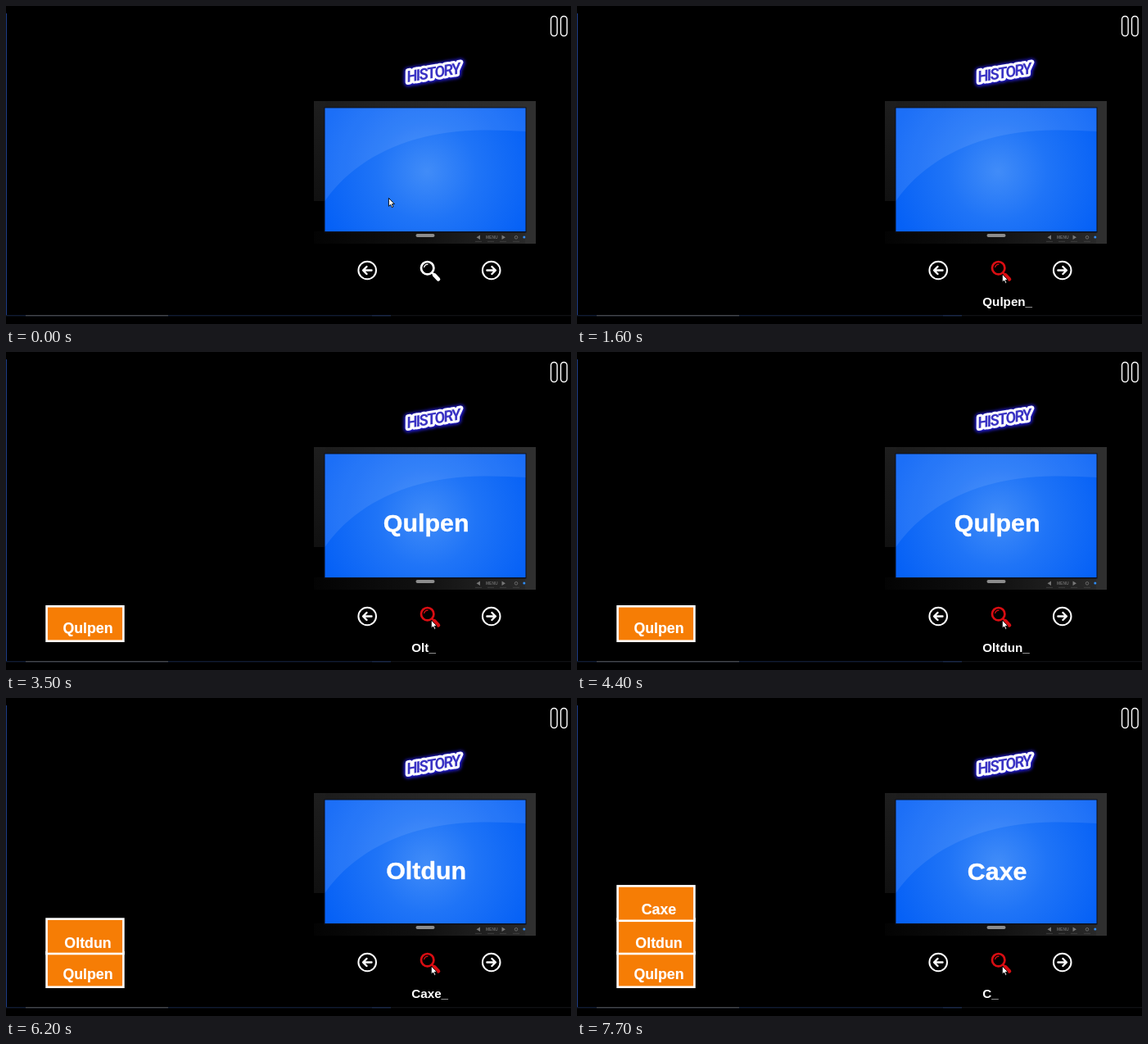
Recreate the animation shown at these times as an HTML page. Size 690 by 388 pixels, loop 8 s.

```html
<!DOCTYPE html>
<html lang="en">
<head>
<meta charset="utf-8">
<title>Search history</title>
<style>
  html, body { margin: 0; width: 100%; height: 100%; overflow: hidden; background: #000; }
  svg { display: block; width: 690px; height: 388px; }
  text { font-family: "Liberation Sans", Arial, sans-serif; font-weight: 700; fill: #fff; }
  .title { font: italic 700 19px Roboto, sans-serif; letter-spacing: -1.6px; text-anchor: middle; }
  .big, .label { text-anchor: middle; stroke: #fff; stroke-width: .4; stroke-linejoin: round; }
  .big { font-size: 30.4px; }
  .label { font-size: 17.8px; stroke-width: .2; }
  .typed { font-size: 15.2px; }
  .line { fill: none; stroke: #fff; stroke-linecap: round; stroke-linejoin: round; }
</style>
</head>
<body>
<svg viewBox="0 0 690 388">
  <defs>
    <radialGradient id="glow" gradientUnits="userSpaceOnUse" cx="514" cy="202" r="135">
      <stop offset="0" stop-color="#418cf8"/>
      <stop offset=".45" stop-color="#1f74f7"/>
      <stop offset="1" stop-color="#0661f6"/>
    </radialGradient>
    <linearGradient id="topBar">
      <stop offset="0" stop-color="#1b1b1b"/>
      <stop offset="1" stop-color="#303030"/>
    </linearGradient>
    <linearGradient id="baseBar">
      <stop offset="0" stop-color="#030303"/>
      <stop offset=".5" stop-color="#111"/>
      <stop offset="1" stop-color="#2c2c2c"/>
    </linearGradient>
    <linearGradient id="sideBar" x2="0" y2="1">
      <stop offset="0" stop-color="#1e1e1e"/>
      <stop offset="1" stop-color="#101010"/>
    </linearGradient>
    <filter id="blur" x="-30%" y="-60%" width="160%" height="220%">
      <feGaussianBlur stdDeviation="2.2"/>
    </filter>
  </defs>

  <rect width="690" height="388"/>
  <rect y="9" width="1" height="369" fill="#1d3c86"/>
  <g id="floor">
    <rect y="377" width="690" height="1.3" fill="#101114"/>
    <rect y="377" width="470" height="1.3" fill="#101c34"/>
    <rect x="24" y="377" width="174" height="1.3" fill="#45474c"/>
    <rect x="447" y="377" width="23" height="1.3" fill="#1a2848"/>
  </g>

  <g class="line" stroke-width="1.4">
    <rect x="665.5" y="12.5" width="7.6" height="24" rx="3.8"/>
    <rect x="677.5" y="12.5" width="7.6" height="24" rx="3.8"/>
  </g>

  <g transform="translate(521.5 81) rotate(-9.5)">
    <text class="title" y="6.8" filter="url(#blur)" style="fill:#2a20ff;stroke:#2a20ff;stroke-width:9;stroke-linejoin:round">HISTORY</text>
    <text class="title" y="6.8" style="stroke:#fff;stroke-width:6;stroke-linejoin:round">HISTORY</text>
    <text class="title" y="6.8" style="fill:#3a33c4">HISTORY</text>
  </g>

  <!-- monitor -->
  <rect x="376" y="116" width="271" height="9" fill="url(#topBar)"/>
  <rect x="376" y="116" width="14" height="122" fill="url(#sideBar)"/>
  <rect x="376" y="275" width="271" height="15" fill="url(#baseBar)"/>
  <rect x="634" y="116" width="13" height="174" fill="#2f2f2f"/>
  <rect x="388.5" y="123.5" width="247" height="153" fill="#0a0f1c"/>
  <rect x="389.5" y="124.5" width="245" height="150.5" fill="url(#glow)"/>
  <path d="M389.5 124.5H634.5V153Q608 151 580 151.5C500 152 428 182 389.5 238Z" fill="#fff" fill-opacity=".09"/>
  <rect x="500.5" y="278" width="23" height="4" rx="2" fill="#8c8c8c"/>
  <g fill="#777">
    <path d="M579 279.5V285L574.5 282.2Z"/>
    <path d="M605.5 279.5V285L610 282.2Z"/>
    <text x="593.3" y="284" text-anchor="middle" style="font-size:5px;fill:#666">MENU</text>
    <circle cx="623" cy="282.3" r="1.8" fill="none" stroke="#777" stroke-width=".8"/>
    <path d="M573 287.3h8M588 287.3h8M603 287.3h8M619 287.3h8" stroke="#444" stroke-width=".8"/>
  </g>
  <circle cx="632.8" cy="282" r="1.5" fill="#2f8dff"/>

  <!-- controls -->
  <g class="line" stroke-width="2">
    <circle cx="441.2" cy="322.5" r="10.8"/>
    <path d="M446.5 322.5H436.5M440.5 318L436 322.5L440.5 327" stroke-width="2.4"/>
    <circle cx="592.7" cy="322.5" r="10.8"/>
    <path d="M587.4 322.5H597.4M593.4 318L597.9 322.5L593.4 327" stroke-width="2.4"/>
  </g>
  <g id="glass" class="line">
    <circle id="ring" cx="514.7" cy="319.7" r="7.7"/>
    <path d="M510.6 318.6Q511.6 315.4 515 315.2" stroke-width="1.2"/>
    <path d="M520.5 325.6L522.5 327.6" stroke-width="2.4"/>
    <path d="M523 328.2L528 333.4" stroke-width="4.6"/>
  </g>

  <g id="tiles"></g>
  <text id="big" class="big" x="513.2"></text>
  <text id="typed" class="typed" x="495.3" y="366"></text>
  <path id="cursor" d="M0 0V10L2.3 8L3.9 11.4L5.5 10.7L4 7.3H7Z" fill="#fff" stroke="#000" stroke-width=".9"/>
</svg>

<script>
  const LOOP = 8000;
  const words = ["Qulpen", "Oltdun", "Caxe", "C"];
  const bigBase = [218.5, 221.3, 221.5];
  const tileTop = [310.3, 269.6, 229.4];
  const labelBase = [343, 304.5, 264];

  // time, words already searched, letters typed (-1: field closed)
  const steps = [
    [0, 0, -1], [500, 0, 0], [900, 0, 1], [1200, 0, 2], [1600, 0, 6],
    [2200, 1, -1], [2900, 1, 0], [3200, 1, 1], [3500, 1, 3], [3900, 1, 4], [4100, 1, 5], [4400, 1, 6],
    [4600, 2, -1], [5200, 2, 0], [5600, 2, 1], [5900, 2, 2], [6000, 2, 3], [6200, 2, 4],
    [6800, 3, -1], [7200, 3, 0], [7700, 3, 1]
  ];
  const HOVER = 300;

  const $ = id => document.getElementById(id);
  const [tiles, big, typed, glass, ring, cursor] =
    ["tiles", "big", "typed", "glass", "ring", "cursor"].map($);

  tiles.innerHTML = tileTop.map((y, i) => `<g>
    <rect x="49.6" y="${y}" width="93.8" height="42.4" fill="#f67d05" stroke="#fff" stroke-width="2.6"/>
    <text class="label" x="100" y="${labelBase[i]}">${words[i]}</text></g>`).join("");

  function draw(t) {
    const [, done, letters] = steps.filter(s => s[0] <= t).pop();
    const open = letters >= 0, hover = t >= HOVER;

    [...tiles.children].forEach((tile, i) =>
      tile.setAttribute("visibility", i < done ? "visible" : "hidden"));
    big.textContent = done ? words[done - 1] : "";
    if (done) big.setAttribute("y", bigBase[done - 1]);
    typed.textContent = open ? words[done].slice(0, letters) + "_" : "";

    glass.style.stroke = open ? "#d90d12" : "#fff";
    ring.setAttribute("stroke-width", hover && !open ? 2.2 : 2.7);
    cursor.setAttribute("transform", hover ? "translate(519.3 327)" : "translate(467.4 234.3)");
  }

  const start = performance.now();
  function tick() {
    draw((performance.now() - start) % LOOP);
    requestAnimationFrame(tick);
  }
  tick();
</script>
</body>
</html>
```
